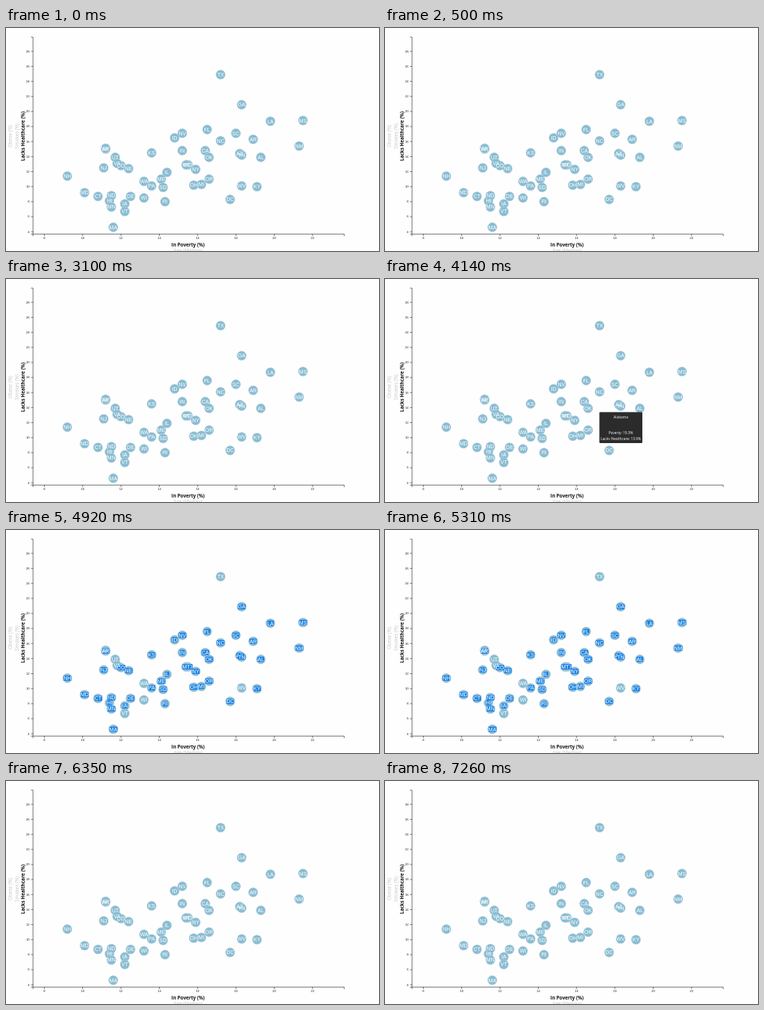
These frames come from a looping animation (500x299 px, 8000 ms). An HTML page:

```html
<!DOCTYPE html>
<html lang="en">
<head>
<meta charset="utf-8">
<title>Poverty and healthcare</title>
<style>
html, body { margin: 0; width: 100%; height: 100%; overflow: hidden; background: #fefefe; }
svg { display: block; width: 100vw; height: 100vh; }
text { text-anchor: middle; font-family: "Open Sans", sans-serif; }
.axis path { fill: none; stroke: #000; stroke-width: .55; }
.axis text { font: 4.2px "Liberation Sans", Arial, sans-serif; fill: #222; }
.axis .left { text-anchor: end; }
.title { font-size: 6.4px; font-weight: 700; fill: #111; }
.idle { font-size: 6.4px; fill: #c6c6c6; }
.dots circle { fill: #89bdd3; stroke: #e3e3e3; stroke-width: .42; }
.codes text { font: 7px "Liberation Sans", Arial, sans-serif; fill: #fff; }
.mark { fill: #1a82e6; }
.tip rect { fill: #2b2b2b; }
.tip text { font-size: 4.8px; fill: #fff; }
</style>
</head>
<body>
<svg viewBox="0 0 500 299" preserveAspectRatio="none">
  <g class="axis"><path d="M33.5 12.2H36.2V276.3H33.5M36.2 279V276.3H453.3V279"/></g>
  <text class="title" x="244" y="293.2">In Poverty (%)</text>
  <text class="idle" x="244" y="301">Age (Median)</text>
  <text class="title" transform="translate(25.3 145) rotate(-90)">Lacks Healthcare (%)</text>
  <text class="idle" transform="translate(16.8 145) rotate(-90)">Smokes (%)</text>
  <text class="idle" transform="translate(8.2 145) rotate(-90)">Obese (%)</text>
  <g class="dots"></g>
  <g class="codes"></g>
  <g class="tip"></g>
</svg>
<script>
const LOOP = 8000;
const TIP = [4140, 4270];
const SELECTION = [4660, 5570];
const LAST_SELECTED = "TN";

// code, poverty %, lacking healthcare %
const states = `AL 19.3 13.9,AK 11.2 15,AZ 18.2 14.4,AR 18.9 16.3,CA 16.4 14.8,CO 12 12.8,CT 10.8 8.7,
DE 12.5 8.7,DC 17.7 8.3,FL 16.5 17.6,GA 18.3 20.9,HI 11.4 8.1,ID 14.8 16.5,IL 14.4 11.9,IN 15.2 14.8,
IA 12.2 7.7,KS 13.6 14.5,KY 19.1 10,LA 19.8 18.7,ME 14.1 11,MD 10.1 9.2,MA 11.6 4.6,MI 16.2 10.3,
MN 11.5 7.3,MS 21.5 18.8,MO 15.5 12.9,MT 15.4 12.9,NE 12.4 12.4,NV 15.2 17.1,NH 9.2 11.4,NJ 11.1 12.5,
NM 21.3 15.4,NY 15.9 12.3,NC 17.2 16.1,ND 11.5 8.8,OH 15.8 10.2,OK 16.6 13.9,OR 16.6 11,PA 13.6 10.1,
RI 14.3 8,SC 18 17.1,SD 14.2 9.9,TN 18.3 14.2,TX 17.2 24.9,UT 11.7 13.9,VT 12.2 6.7,VA 11.8 13.1,
WA 13.2 10.7,WV 18.3 10.1,WI 13.2 8.5,WY 11.2 15.1`.split(",").map(row => {
  const [code, poverty, care] = row.trim().split(" ");
  return { code, poverty: +poverty, care: +care };
});

const scaleX = v => 51.4 + (v - 8) * 25.68;
const scaleY = v => 273.2 - (v - 4) * 10.08;
const pick = selector => document.querySelector(selector);
const [axis, dots, codes, tip] = [".axis", ".dots", ".codes", ".tip"].map(pick);

function add(parent, tag, attrs, text = "") {
  const node = document.createElementNS("http://www.w3.org/2000/svg", tag);
  for (const key in attrs) node.setAttribute(key, attrs[key]);
  node.textContent = text;
  return parent.appendChild(node);
}

for (let v = 8; v <= 22; v += 2) {
  const x = scaleX(v);
  add(axis, "path", { d: `M${x} 276.3v2.6` });
  add(axis, "text", { x, y: 283.4 }, v);
}
for (let v = 4; v <= 28; v += 2) {
  const y = scaleY(v);
  add(axis, "path", { d: `M33.6 ${y}h2.6` });
  add(axis, "text", { x: 31.6, y: y + 1.4, class: "left" }, v);
}

const marks = [];
const lastSelected = states.findIndex(s => s.code === LAST_SELECTED);
states.forEach(({ code, poverty, care }, i) => {
  const x = scaleX(poverty), y = scaleY(care);
  add(dots, "circle", { cx: x, cy: y, r: 6.3 });
  const label = add(codes, "text", { x, y: y + 2.5 }, code);
  if (i > lastSelected) return;
  const { x: left, y: top, width, height } = label.getBBox();
  const mark = add(codes, "rect", { class: "mark", x: left, y: top, width, height });
  codes.insertBefore(mark, label);
  marks.push(mark);
});

const { poverty, care } = states[0];
const tipX = scaleX(poverty) - 25.5, tipY = scaleY(care) + 5;
add(tip, "rect", { x: tipX - 28.7, y: tipY, width: 57.6, height: 41.6, rx: 1.2 });
[["Alabama", 8.6], [`Poverty: ${poverty}%`, 30], [`Lacks Healthcare: ${care}%`, 37.2]]
  .forEach(([line, dy]) => add(tip, "text", { x: tipX, y: tipY + dy }, line));

const start = performance.now();
const show = (node, on) => { node.style.display = on ? "" : "none"; };
function draw(now) {
  const t = Math.max(0, now - start) % LOOP;
  const within = ([from, to]) => t >= from && t < to;
  show(tip, within(TIP));
  marks.forEach(mark => show(mark, within(SELECTION)));
  requestAnimationFrame(draw);
}
draw(start);
</script>
</body>
</html>
```
